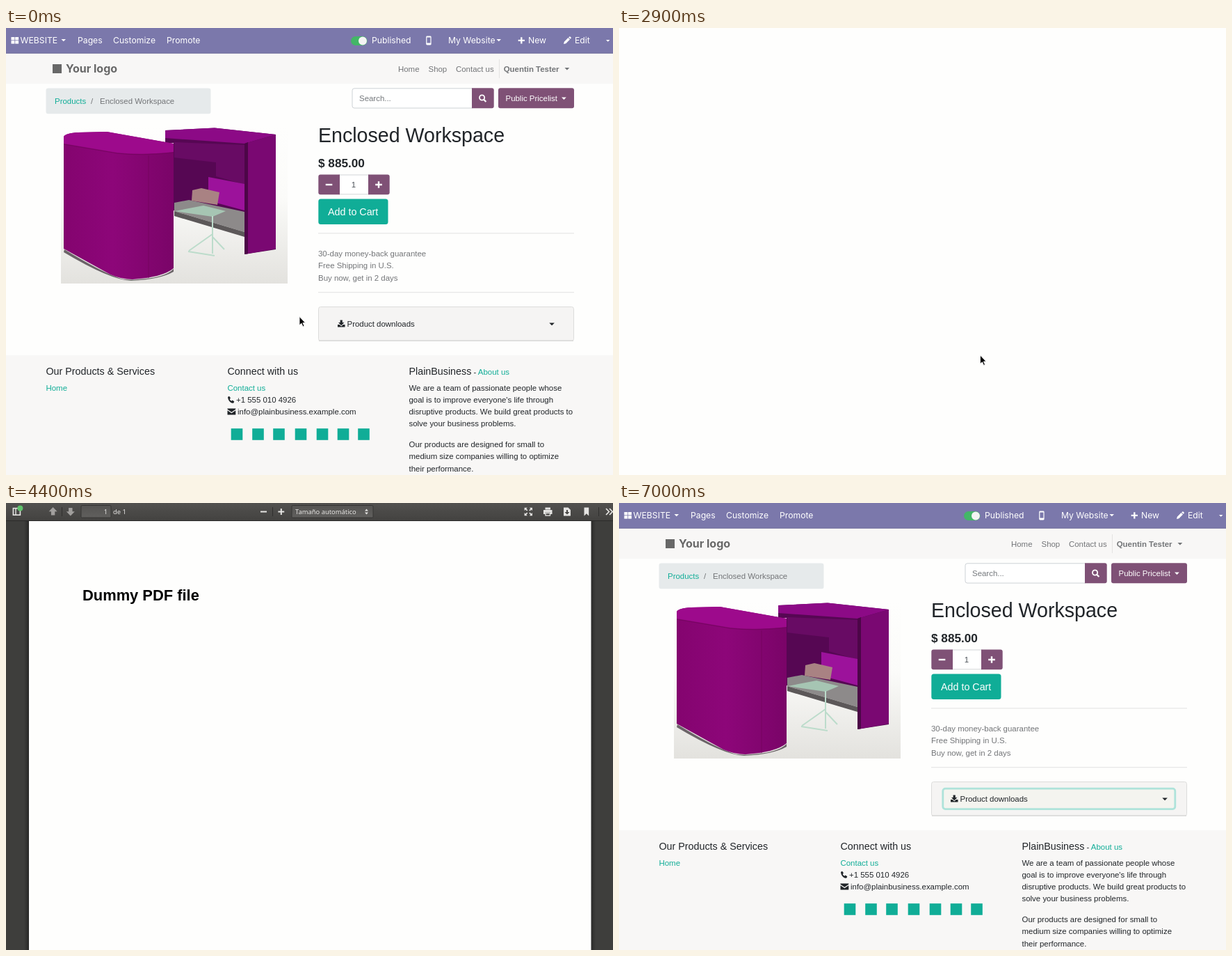
Write an HTML page that moves like this. It is 873 px wide and 642 px high and loops after 7.8 s.

```html
<!DOCTYPE html>
<html lang="en">
<head>
<meta charset="utf-8">
<title>Product downloads</title>
<style>
  html, body { margin: 0; width: 100%; height: 100%; overflow: hidden; background: #fefefd; }
  svg { display: block; }
  text { font-family: "Liberation Sans", Arial, sans-serif; white-space: pre; }
  .nav { font-family: Inter, sans-serif; }
  .pdf { font-family: "Noto Sans", sans-serif; }
</style>
</head>
<body>
<svg id="stage" width="873" height="642" viewBox="0 0 873 642"></svg>
<script>
const LOOP = 7800, OPEN = 153.6, BODY = 11.44, HEAD = 14.3;
const TEAL = '#10ad97', PLUM = '#7f5176', INK = '#212529', GREY = '#737578', BAR = '#7b78ab';

// Text is placed by its left edge and the middle of its capitals.
const text = (x, y, str, fill = INK, size = BODY, more = '') =>
  `<text x="${x}" y="${y + size * 0.352}" font-size="${size}" fill="${fill}" ${more}>${str}</text>`;
const rect = (x, y, w, h, fill, more = '') =>
  `<rect x="${x}" y="${y}" width="${w}" height="${h}" fill="${fill}" ${more}/>`;
const path = (d, fill, more = '') => `<path d="${d}" fill="${fill}" ${more}/>`;
const line = (d, stroke, width = 1) => path(d, 'none', `stroke="${stroke}" stroke-width="${width}"`);
const caret = (x, y, w, fill) => path(`M${x} ${y}h${w}l${-w / 2} ${w / 2}z`, fill);
const plus = (x, y, r, fill, w) => line(`M${x - r} ${y}h${2 * r}M${x} ${y - r}v${2 * r}`, fill, w);
const group = (id, body, more = '') => `<g id="${id}" ${more}>${body}</g>`;

const BOLD = 'font-weight="700"', NAV = 'class="nav"', PDF = 'class="pdf"';

function topBar() {
  const label = (x, str) => text(x, 18, str, '#fff', 12.2, NAV);
  return rect(0, 0, 873, 36.5, BAR) + rect(0, 35.6, 873, 1.2, '#6c6998')
    + [[7.5, 13], [13.2, 13], [7.5, 18.2], [13.2, 18.2]].map(([x, y]) => rect(x, y, 4.9, 4.4, '#fff')).join('')
    + label(20.5, 'WEBSITE') + caret(79.5, 16, 6.5, '#fff')
    + label(103, 'Pages') + label(154, 'Customize') + label(231, 'Promote')
    + rect(496, 12, 23.5, 13, '#43b667', 'rx="6.5"') + '<circle cx="513" cy="18.5" r="6" fill="#f4f4f4"/>'
    + label(526, 'Published')
    + rect(604.2, 11.5, 7.4, 13, '#fff', 'rx="1.4"') + rect(605.4, 13.5, 5, 8, BAR)
    + label(636, 'My Website') + caret(705.5, 16, 6.5, '#fff')
    + plus(741.3, 17.8, 4.6, '#fff', 2.3) + label(751, 'New')
    + path('M802 23l.8-3.2 5.7-5.7 2.5 2.5-5.7 5.7zM809.2 13.4l1-1q.7-.5 1.4 0l1 1q.6.7 0 1.4l-1 1z', '#fff')
    + label(818, 'Edit') + caret(863, 17, 5.4, '#fff');
}

function header() {
  return rect(0, 36.8, 873, 43.4, '#f8f7f6')
    + rect(67, 52, 13, 13, '#686868') + text(86, 58.5, 'Your logo', '#686868', 16, `${NAV} ${BOLD}`)
    + text(564, 59, 'Home', GREY) + text(607.5, 59, 'Shop', GREY) + text(647, 59, 'Contact us', GREY)
    + rect(709, 45, 1, 27, '#e4e3e2')
    + text(715.7, 59, 'Quentin Tester', GREY, BODY, BOLD) + caret(803.5, 57, 6.8, GREY);
}

function toolRow() {
  return rect(57.5, 86.5, 237, 36.7, '#e6eaeb', 'rx="3"')
    + text(70, 105, 'Products', TEAL) + text(122, 105, '/', GREY) + text(135, 105, 'Enclosed Workspace', GREY)
    + rect(498, 86.8, 175, 28.2, '#fff', 'rx="3" stroke="#ced2d6"') + text(508, 101, 'Search...', '#74787c')
    + path('M670 86.3h28.7q3 0 3 3v23q0 3-3 3h-28.7z', PLUM)
    + '<circle cx="684.6" cy="100" r="3.6" fill="none" stroke="#fff" stroke-width="1.8"/>'
    + line('M687.2 102.8l3.2 3.2', '#fff', 2.2)
    + rect(708, 86.3, 109, 29, PLUM, 'rx="3"') + text(718.5, 101, 'Public Pricelist', '#fff')
    + caret(799, 99.5, 6.8, '#fff');
}

function photo() {
  return rect(79, 142, 326, 225, 'url(#floor)')
    + path('M229 147L300 143.5 388 153V318L343 325V290L241 262V165H229z', '#560753')
    + path('M229 147L300 143.5 388 153 343 166 229 158z', '#8c0a86')
    + path('M242 164L343 168V225L302 213V193L242 186z', '#680b64')
    + path('M291 214L343 224V262L291 248z', '#9c129b')
    + path('M242 251L263 247 343 264V293L242 263z', '#8d8a8a')
    + path('M242 263L343 293V300L242 270z', '#5c5859')
    + path('M343 166L388 153V317L343 325z', '#7a0872') + path('M343 166L348 164V324L343 325z', '#4c0647')
    + path('M268 233L281 230 307 236 304 254 267 248z', '#a98283')
    + path('M243 263L284 255 316 263 297 271z', '#a9cdb9', 'opacity=".9"')
    + line('M297 270V324M297 296L263 320M297 300L314 318M262 321L300 327', '#bcdccb', 2)
    + path('M84 318Q135 349 160 358 170 363 190 361 228 359 241 346V350Q222 361 180 363 150 362 83 322z', '#6b6468')
    + path('M83 156Q86 151 104 150L145 149 241 166V345Q226 358 182 361 166 361 150 354L83 317z', 'url(#panel)')
    + path('M83 156Q86 151 104 150L145 149 241 166V178Q195 183 160 179L83 166z', '#9d0a8c')
    + line('M83 167L160 180Q195 184 241 179M205 183V359', '#74055f', 0.9);
}

function product() {
  const box = 'M452.3 210.5H480V239.3H452.3q-3 0-3-3V213.5q0-3 3-3z';
  return text(449, 154, 'Enclosed Workspace', INK, 28.6)
    + text(449, 194.3, '$ 885.00', INK, 17.2, BOLD)
    + rect(479, 211, 43, 27.8, '#fff', 'stroke="#d3d6d9"')
    + path(box, PLUM) + path(box, PLUM, 'transform="translate(1001 0) scale(-1 1)"')
    + line('M459.7 225h9.6', '#fff', 2.4) + plus(536, 225, 4.8, '#fff', 2.4)
    + text(500, 225, '1', '#495057', BODY, 'text-anchor="middle"')
    + rect(449.3, 245.5, 100.2, 36.5, TEAL, 'rx="3.5"') + text(463, 263.7, 'Add to Cart', '#fff', HEAD)
    + rect(449, 294.4, 368, 1, '#e2e2e1') + rect(449, 379.2, 368, 1, '#e2e2e1')
    + ['30-day money-back guarantee', 'Free Shipping in U.S.', 'Buy now, get in 2 days']
        .map((s, i) => text(449, 324.2 + i * 17.16, s, GREY)).join('');
}

function downloads() {
  const rows = ['Technical specifications', 'Set up instructions', 'Warranty'].map((s, i) => {
    const y = 475 + i * 51.4;
    return rect(469, y - 14.6, 26, 28.8, '#943338', 'rx="3"')
      + text(504, y, s, '#219d8a', BODY, 'class="link"')
      + (i ? rect(450, y - 26, 366, 1, '#dcdcdb') : '');
  }).join('');
  return group('rows', rows, 'clip-path="url(#fold)"')
    + rect(449.5, 400.5, 367, 49, '#f5f4f3', 'rx="3"') + rect(450, 448.4, 366, 1.4, '#d4d4d3')
    + rect(449.5, 400.5, 367, 49, 'none', 'id="card" rx="3" stroke="#dcdcdb"')
    + group('ring', rect(465.8, 410.2, 334, 29.4, '#f4f4ef', 'rx="3.5" stroke="#aee3da" stroke-width="2.8"'))
    + path('M480.6 419.5h3.2v3.6h2.6l-4.2 4.1-4.2-4.1h2.6zM477 426h2.6l2.6 2.4 2.6-2.4h2.7v3.6h-10.5z', INK)
    + text(490.5, 425.3, 'Product downloads') + caret(781.3, 423.4, 7.6, INK);
}

function footer() {
  const about = ['We are a team of passionate people whose', "goal is to improve everyone's life through",
    'disruptive products. We build great products to', 'solve your business problems.'];
  const aim = ['Our products are designed for small to', 'medium size companies willing to optimize', 'their performance.'];
  const para = (y, rows) => rows.map((s, i) => text(579.5, y + i * 17.16, s)).join('');
  return rect(0, 470, 873, 180, '#f8f7f6')
    + text(57.5, 493, 'Our Products &amp; Services', INK, HEAD) + text(57.5, 516.6, 'Home', TEAL)
    + text(318.5, 493, 'Connect with us', INK, HEAD) + text(318.5, 516.6, 'Contact us', TEAL)
    + path('M319 530l2-1.2 2 2.8-1.3 1.4q.8 2 2.7 2.8l1.3-1.3 2.6 1.9-1 2.1q-2 .9-4.5-1-3.5-2.600-3.800-7.500z', INK)
    + text(331, 533.8, '+1 555 010 4926')
    + path('M318.500 546.600h11.800v1.200l-5.900 4-5.900-4zM318.500 549.200l5.900 4 5.900-4v6.300h-11.800z', INK)
    + text(333, 551, 'info@plainbusiness.example.com')
    + [332, 362.5, 392.5, 424, 455, 485, 514.5].map(x => rect(x - 8.3, 575.2, 16.6, 16.6, TEAL)).join('')
    + text(579.5, 493, `PlainBusiness<tspan font-size="${BODY}"> - <tspan fill="${TEAL}">About us</tspan></tspan>`, INK, HEAD)
    + para(516.6, about) + para(598.2, aim);
}

function viewer() {
  const pale = '#e6e5e3', dim = '#a19f9d';
  const arrow = 'M0 -6l6 6.200h-3.300v5.200h-5.400v-5.200h-3.300z';
  const field = (x, w) => rect(x, 3.5, w, 17.5, 'url(#field)', 'rx="1.5" stroke="#353433" stroke-width=".9"');
  const split = x => rect(x, 6, 1, 13, '#302f2e');
  const label = (x, str, more = '') => text(x, 12.6, str, pale, 9.4, `${PDF} ${more}`);
  const sheet = rect(26, 25, 822, 617, 'url(#shade)') + rect(33, 25, 808.5, 617, '#fefefd');
  const spinner = Array.from({ length: 10 }, (_, i) =>
    `<rect x="-1" y="-9" width="2" height="5" rx="1" fill="#999" opacity="${0.2 + i * 0.08}" transform="translate(437 599) rotate(${i * 36})"/>`).join('');
  return rect(0, 0, 873, 642, '#3e3e3c')
    + group('sheet', sheet) + group('spinner', spinner)
    + group('doc', text(110, 132, 'Dummy PDF file', '#000', 21.9, BOLD))
    + rect(0, 0, 873, 25.500, 'url(#tools)') + rect(0, 25, 873, 1, '#2b2b2a')
    + group('progress', rect(0, 25, 873, 3.8, '#333231'))
    + rect(10.400, 7.600, 10, 9.600, 'none', `stroke="${pale}" stroke-width="1.6"`) + rect(13.300, 8, 1.400, 9, pale)
    + '<circle id="dot" cx="20.400" cy="7.400" r="4" fill="#5fc36b"/>'
    + path(arrow, dim, 'transform="translate(67.600 12)"') + split(80)
    + path(arrow, dim, 'transform="translate(92.800 12.500) scale(1 -1)"')
    + field(108, 43)
    + group('zero', label(146, '0', 'text-anchor="end"') + label(154, 'de 0'))
    + group('one', label(146, '1', 'text-anchor="end"') + label(154, 'de 1'))
    + line('M366 12.500h9', pale, 2) + split(383) + plus(395.800, 12.500, 4.400, pale, 2)
    + field(411, 117) + label(416, 'Tamaño automático')
    + path('M516 11.500l2.500-3 2.500 3zM516 13.500l2.500 3 2.500-3z', pale)
    + [0, 90, 180, 270].map(a => path('M-5.700-5.700h4.200l-1.500 1.500 2 2-1.200 1.200-2-2-1.500 1.500z', pale,
        `transform="translate(751.300 12.500) rotate(${a})"`)).join('')
    + path('M775.500 6.500h7.500v3h-7.500zM773 10h12.500v6h-2.500v-2.500h-7.500v2.500h-2.500z', pale)
    + rect(776, 14.500, 6.500, 3.500, 'none', `stroke="${pale}" stroke-width="1.300"`)
    + path('M802 6.500h6.500l3.500 3.500v8.500h-10z', pale)
    + path('M806 10h2v3h2.500l-3.500 3.500-3.500-3.500h2.500z', '#474644')
    + path('M831.500 6.500h6.700v12l-3.350-3.300-3.350 3.300z', dim, 'id="mark"') + split(852)
    + line('M863 8l4.300 4.500-4.300 4.500M868 8l4.300 4.500-4.300 4.500', pale, 1.700);
}

const fade = (id, dir, stops) => `<linearGradient id="${id}" ${dir}>`
  + stops.map(([at, c]) => `<stop offset="${at}" stop-color="${c}"/>`).join('') + '</linearGradient>';
const DOWN = 'x2="0" y2="1"';
const defs = '<defs>'
  + fade('floor', DOWN, [[0, '#fefefd'], [0.45, '#fbfbf9'], [1, '#e3e2de']])
  + fade('panel', '', [[0, '#84046f'], [0.45, '#8d0679'], [1, '#7a0468']])
  + fade('tools', DOWN, [[0, '#52514f'], [1, '#434240']])
  + fade('field', DOWN, [[0, '#555452'], [1, '#605f5d']])
  + fade('shade', '', [[0, '#3e3e3c'], [0.0085, '#282827'], [0.9915, '#282827'], [1, '#3e3e3c']])
  + '<clipPath id="fold"><rect id="foldBox" x="449" y="449" width="369" height="0"/></clipPath></defs>';

const arrowShape = path('M0 0V12.300L2.900 9.700 5.100 14.400 7 13.500 4.900 9H8.600z', '#000', 'stroke="#f4f4f4" stroke-width=".9"');
const handShape = path('M.3.400Q1.400-.6 2.400.400L5 3.500 7.600 2.600 10.600 3.600 12.500 6V10.500L11.500 13H4.500L3.300 10.300 0 9.300Q-.8 8.300.5 7.600L3.400 7.600z',
  '#000', 'stroke="#f4f4f4" stroke-width=".8" transform="translate(-5 -1)"');

document.getElementById('stage').innerHTML = defs
  + group('page', rect(0, 0, 873, 642, '#fefefd') + topBar() + header() + toolRow() + photo() + product()
    + downloads() + group('footer', footer()))
  + group('viewer', viewer())
  + group('arrow', arrowShape) + group('hand', handShape);

const $ = id => document.getElementById(id);
const links = document.querySelectorAll('.link');

// Each table holds its value until the next time.
const screens = [[0, 'page'], [2800, 'blank'], [3000, 'viewer'], [5200, 'page']];
const folds = [[0, 0], [500, 0.12], [600, 0.55], [700, 0.9], [800, 1], [6100, 0.88], [6200, 0.45], [6300, 0.1], [6400, 0]];
const rings = [[0, 0], [500, 0.3], [600, 1], [2400, 0], [6000, 0.18], [6100, 0.8], [6200, 1]];
const hovers = [[0, -1], [1800, 1], [2200, -1], [2300, 0], [2800, -1]];
const cursors = [
  [0, 'arrow', 422, 414.500], [200, 'arrow', 447, 417], [300, 'hand', 484, 419], [400, 'hand', 512, 420],
  [1100, 'hand', 534, 424], [1300, 'hand', 532, 436], [1400, 'arrow', 527, 454], [1500, 'arrow', 520, 484],
  [1600, 'arrow', 513, 496], [1800, 'hand', 528, 525], [2100, 'hand', 526, 519], [2200, 'arrow', 523, 495],
  [2300, 'hand', 521, 477], [2400, 'hand', 520, 471], [2800, 'arrow', 519.500, 470],
  [3900, 'arrow', 497, 380], [4000, 'arrow', 474, 225], [4100, 'arrow', 470, 95], [4200, 'arrow', 496, 29],
  [4400, ''], [5300, 'arrow', 520, 60], [5400, 'arrow', 548, 150], [5500, 'arrow', 578, 250],
  [5600, 'arrow', 602, 335], [5700, 'arrow', 616, 392], [5800, 'hand', 622, 420], [5900, 'hand', 625, 428],
  [6600, 'arrow', 555, 375], [6700, 'arrow', 415, 262], [6800, 'arrow', 240, 140], [6900, 'arrow', 70, 38], [7000, ''],
];
const at = (table, t) => table.findLast(row => row[0] <= t);
const show = (id, on) => { $(id).style.display = on ? '' : 'none'; };

function draw(t) {
  const screen = at(screens, t)[1], fold = at(folds, t)[1] * OPEN, hover = at(hovers, t)[1];
  show('page', screen === 'page');
  show('viewer', screen === 'viewer');

  $('foldBox').setAttribute('height', fold);
  $('card').setAttribute('height', 49 + fold);
  $('footer').setAttribute('transform', `translate(0 ${fold})`);
  $('ring').setAttribute('opacity', at(rings, t)[1]);
  links.forEach((link, i) => {
    link.setAttribute('fill', i === hover ? '#07463f' : '#219d8a');
    link.setAttribute('text-decoration', i === hover ? 'underline' : 'none');
  });

  const paged = t >= 3200, loaded = t >= 3400;
  show('sheet', paged);
  show('one', paged);
  show('zero', !paged);
  show('progress', !paged);
  show('spinner', paged && !loaded);
  show('doc', loaded);
  show('dot', loaded);
  $('mark').setAttribute('fill', paged ? '#e6e5e3' : '#8f8e8c');

  const [, kind, x, y] = at(cursors, t);
  for (const id of ['arrow', 'hand']) {
    show(id, id === kind);
    if (id === kind) $(id).setAttribute('transform', `translate(${x} ${y})`);
  }
}

const start = performance.now();
function tick() {
  draw((performance.now() - start) % LOOP);
  requestAnimationFrame(tick);
}
tick();
</script>
</body>
</html>
```
